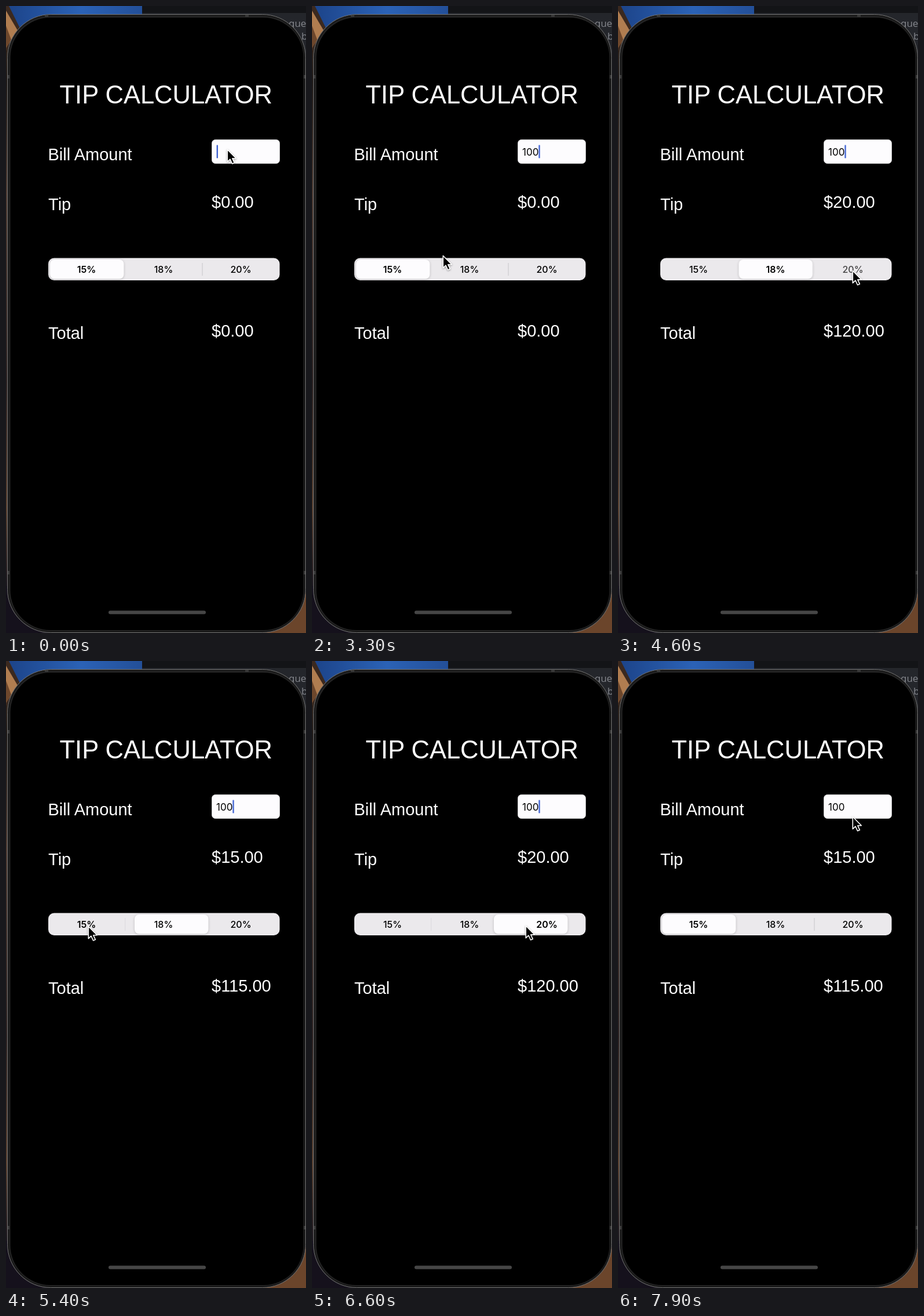
Recreate the animation shown at these times as an HTML page. Size 518 by 1081 pixels, loop 8000 ms.

```html
<!DOCTYPE html>
<html lang="en">
<head>
<meta charset="utf-8">
<title>Tip Calculator</title>
<style>
html, body { margin: 0; width: 100%; height: 100%; overflow: hidden; background: #000; }
svg { display: block; }
.stage { width: 518px; height: 1081px; }
.app text { font: 29px "Liberation Sans", Arial, sans-serif; fill: #fff; }
.app .title { font-size: 43.5px; }
.seg text { font: 500 16px Inter, sans-serif; fill: #000; text-anchor: middle; }
.app .bill text { font: 17px Inter, sans-serif; fill: #000; }
.editor { font: 17px "Open Sans", sans-serif; fill: #85878d; }
.thumb { fill: #fdfcfe; filter: drop-shadow(0 1px 2px #0003); }
.rule { fill: #cfcdd1; }
.cursor { filter: drop-shadow(0 1.5px 1.5px #0006); }

/* everything runs on one eight-second clock */
.anim { animation: 8s step-end infinite; }
.typed { animation-name: typed; }
.amount { animation-name: amount; }
.caret { animation-name: blink, advance; animation-duration: 8s; animation-timing-function: step-end; animation-iteration-count: infinite; }
.thumb { animation-name: slide; }
.l15 { animation-name: l15; }
.l18 { animation-name: l18; }
.l20 { animation-name: l20; }
.r1 { animation-name: r1; }
.r2 { animation-name: r2; }
.cursor { animation-name: travel; }

/* strips of values, one row every 60px */
@keyframes typed {
  0% { transform: translateY(0); }
  16.25% { transform: translateY(-60px); }
  21.25% { transform: translateY(-120px); }
  26.25%, 100% { transform: translateY(-180px); }
}
@keyframes amount {
  0% { transform: translateY(0); }
  47.5%, 72.5% { transform: translateY(-120px); }
  57.5%, 80% { transform: translateY(-180px); }
  66.25%, 92.5%, 100% { transform: translateY(-60px); }
}
@keyframes advance {
  0% { transform: translateX(0); }
  16.25% { transform: translateX(7px); }
  21.25% { transform: translateX(17.2px); }
  26.25%, 100% { transform: translateX(27.7px); }
}
@keyframes blink {
  0%, 10%, 38.75%, 51.25%, 63.75%, 76.25%, 88.75% { opacity: 1; }
  1.25%, 8.75%, 33.75%, 37.5%, 46.25%, 50%, 58.75%, 62.5%, 71.25%, 75%, 83.75%, 87.5%, 96.25% { opacity: .3; }
  2.5%, 35%, 47.5%, 60%, 72.5%, 85%, 97.5%, 100% { opacity: 0; }
}
@keyframes slide {
  0%, 71.25%, 97.5%, 100% { transform: translateX(0); }
  48.75%, 73.75% { transform: translateX(60px); }
  50%, 75% { transform: translateX(104.5px); }
  51.25%, 76.25% { transform: translateX(126px); }
  52.5%, 77.5% { transform: translateX(132.5px); }
  58.75%, 81.25% { transform: translateX(192px); }
  60%, 82.5% { transform: translateX(238px); }
  61.25%, 83.75% { transform: translateX(259px); }
  62.5%, 85% { transform: translateX(266px); }
  67.5%, 93.75% { transform: translateX(146px); }
  68.75%, 95% { transform: translateX(56px); }
  70%, 96.25% { transform: translateX(13px); }
}
@keyframes l15 {
  0%, 67.5%, 93.75%, 100% { font-weight: 600; opacity: 1; }
  48.75%, 73.75% { font-weight: 500; opacity: 1; }
  65%, 91.25% { font-weight: 500; opacity: .7; }
}
@keyframes l18 {
  0%, 58.75%, 81.25%, 100% { font-weight: 500; opacity: 1; }
  46.25%, 71.25% { font-weight: 500; opacity: .7; }
  48.75%, 73.75% { font-weight: 600; opacity: 1; }
}
@keyframes l20 {
  0%, 67.5%, 93.75%, 100% { font-weight: 500; opacity: 1; }
  56.25%, 78.75% { font-weight: 500; opacity: .7; }
  58.75%, 81.25% { font-weight: 600; opacity: 1; }
}
@keyframes r1 {
  0%, 68.75%, 95%, 100% { opacity: 0; }
  60%, 67.5%, 82.5%, 93.75% { opacity: .4; }
  61.25%, 83.75% { opacity: 1; }
}
@keyframes r2 {
  0%, 70%, 96.25%, 100% { opacity: 1; }
  50%, 68.75%, 75%, 95% { opacity: .3; }
  51.25%, 76.25% { opacity: 0; }
}
@keyframes travel {
  0% { transform: translate(382px, 247px); }
  31.25% { transform: translate(382px, 247px); animation-timing-function: steps(8); }
  41.25% { transform: translate(226px, 430px); animation-timing-function: steps(3); }
  45% { transform: translate(275px, 456px); }
  48.75% { transform: translate(275px, 456px); animation-timing-function: steps(5); }
  55% { transform: translate(405px, 456px); }
  58.75% { transform: translate(405px, 456px); animation-timing-function: steps(5); }
  65% { transform: translate(142px, 457px); }
  67.5% { transform: translate(142px, 457px); animation-timing-function: steps(3); }
  71.25% { transform: translate(275px, 456px); }
  72.5% { transform: translate(275px, 456px); animation-timing-function: steps(2); }
  75% { transform: translate(332px, 455px); animation-timing-function: steps(2); }
  77.5% { transform: translate(405px, 456px); }
  81.25% { transform: translate(405px, 456px); animation-timing-function: steps(7); }
  90% { transform: translate(152px, 456px); }
  92.5% { transform: translate(152px, 456px); animation-timing-function: steps(4); }
  97.5% { transform: translate(405px, 270px); }
  98.75%, 100% { transform: translate(405px, 268px); }
}
</style>
</head>
<body>
<svg class="stage" viewBox="0 0 518 1081">
  <defs>
    <linearGradient id="sky">
      <stop offset="0" stop-color="#1c4388"/>
      <stop offset=".55" stop-color="#2b62b6"/>
      <stop offset="1" stop-color="#234f98"/>
    </linearGradient>
    <linearGradient id="edge" x2="0" y2="1">
      <stop offset="0" stop-color="#4a3526"/>
      <stop offset=".12" stop-color="#1c1715"/>
      <stop offset=".3" stop-color="#4d3a31"/>
      <stop offset=".6" stop-color="#2a2020"/>
      <stop offset=".8" stop-color="#59402f"/>
      <stop offset=".93" stop-color="#17131c"/>
    </linearGradient>
  </defs>

  <!-- desktop behind the phone -->
  <rect width="518" height="1081" fill="url(#edge)"/>
  <rect width="236" height="60" fill="url(#sky)"/>
  <path d="M0 0H5L24 38L0 78Z" fill="#3b291f"/>
  <path d="M0 8L20 42L0 72Z" fill="#b07d50"/>
  <path d="M0 34L9 58L0 72Z" fill="#6d472c"/>
  <rect x="235" width="283" height="13" fill="#131417"/>
  <rect x="235" y="12" width="283" height="90" fill="#24262b"/>
  <g class="editor">
    <text x="488" y="36">que</text>
    <text x="510" y="58">b</text>
  </g>
  <path d="M0 1000H90V1081H0Z" fill="#15111c"/>
  <path d="M430 1081L518 1010V1081Z" fill="#6b452b"/>

  <!-- phone -->
  <rect x="2.5" y="14.5" width="515" height="1066" rx="75" fill="#242424" stroke="#747474"/>
  <rect x="4.5" y="16.5" width="511" height="1062" rx="73" fill="none" stroke="#181818" stroke-width="2"/>
  <path d="M67 17h6M413 17h6M4.5 119v6M4.5 974v6M515.5 119v6M515.5 974v6" stroke="#3c3c3c" stroke-width="3"/>
  <rect x="7.5" y="20" width="506" height="1056" rx="69"/>
  <rect x="177" y="1042.5" width="168" height="6" rx="3" fill="#464646"/>

  <g class="app">
    <text class="title" x="92.5" y="168">TIP CALCULATOR</text>
    <text x="72.5" y="266">Bill Amount</text>
    <text x="73" y="352">Tip</text>
    <text x="73" y="574">Total</text>

    <svg x="355" y="318" width="130" height="45">
      <g class="anim amount">
        <text y="30">$0.00</text>
        <text y="90">$15.00</text>
        <text y="150">$18.00</text>
        <text y="210">$20.00</text>
      </g>
    </svg>
    <svg x="355" y="540" width="130" height="45">
      <g class="anim amount">
        <text y="30">$0.00</text>
        <text y="90">$115.00</text>
        <text y="150">$118.00</text>
        <text y="210">$120.00</text>
      </g>
    </svg>

    <rect x="355.5" y="230.5" width="117" height="41" rx="6" fill="#fdfcfe" stroke="#d8d7da" stroke-width=".8"/>
    <svg class="bill" x="363" y="232" width="60" height="38">
      <g class="anim typed">
        <text y="85.5">1</text>
        <text y="145.5">10</text>
        <text y="205.5">100</text>
      </g>
    </svg>
    <rect class="caret" x="363.6" y="239.5" width="2.4" height="23" rx="1.2" fill="#3f63d2"/>
  </g>

  <g class="seg">
    <rect x="73" y="434.5" width="399.5" height="38.5" rx="10" fill="#ebe9ec"/>
    <rect class="anim rule r1" x="205" y="443" width="1.3" height="22"/>
    <rect class="anim rule r2" x="338.4" y="443" width="1.3" height="22"/>
    <rect class="anim thumb" x="76" y="437" width="127.5" height="33.5" rx="8"/>
    <text class="anim l15" x="139" y="460">15%</text>
    <text class="anim l18" x="272" y="460">18%</text>
    <text class="anim l20" x="405.5" y="460">20%</text>
  </g>

  <path class="anim cursor" d="M.3 .5V21.6L5 17.2L8.6 25L12.4 23.3L8.9 15.8H15.3Z" stroke="#fff" stroke-width="1.6" stroke-linejoin="round"/>
</svg>
</body>
</html>
```
